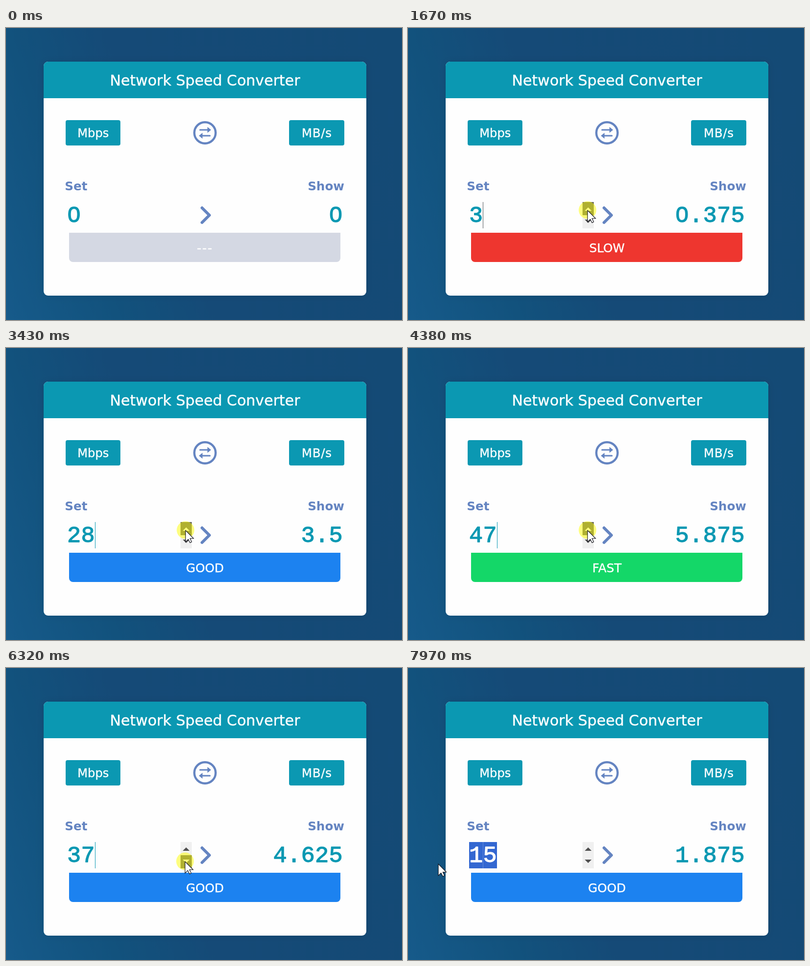
An HTML page with a canvas for the animation above (8 s loop, 810 by 599 pixels).

```html
<!DOCTYPE html>
<html lang="en">
<head>
<meta charset="utf-8">
<title>Network Speed Converter</title>
<style>
  html, body { margin: 0; width: 100%; height: 100%; overflow: hidden; background: #154b77; }
  canvas { display: block; }
</style>
</head>
<body>
<canvas id="stage" width="810" height="599"></canvas>
<script>
const ctx = document.getElementById('stage').getContext('2d');
const LOOP = 8000, FIRST_STEP = 190, STEP = 67.65;
const REPEAT_DELAY = 250, REPEAT = 50;
const TEAL = '#0b98b2', INDIGO = '#6484c1', WHITE = '#fefefe';
const SANS = '"DejaVu Sans", sans-serif', MONO = '"Liberation Mono", monospace';
const DIGIT = 28.5;

// Times the mouse button is held: [down, up]
const FIELD_CLICK = [510, 600], DRAG = [7590, 7950];
const UP_PRESSES = [[1140, 1210], [1400, 1470], [1640, 1710], [1770, 1835],
  [1895, 1960], [2020, 2085], [2145, 4780]];
const DOWN_PRESSES = [[5180, 7360]];
// Pointer path: [time, x, y]
const PATH = [[190, 430, 447], [500, 290, 392], [600, 290, 392], [1100, 367.2, 374],
  [4800, 367.2, 374], [5050, 366.2, 397], [7360, 366.2, 397], [7590, 290, 392], [7900, 62, 402]];

const clamp = (v, lo, hi) => Math.min(hi, Math.max(lo, v));
const isHeld = (t, presses) => presses.some(([down, up]) => t >= down && t < up);

// One step per press, then auto-repeat while it is held
function stepsOf(t, presses) {
  return presses.reduce((sum, [down, up]) => {
    if (t < down) return sum;
    const repeats = Math.floor((Math.min(t, up) - down - REPEAT_DELAY) / REPEAT) + 1;
    return sum + 1 + Math.max(0, repeats);
  }, 0);
}

function pointerAt(t) {
  const next = PATH.findIndex(([time]) => time > t);
  if (next < 0) return PATH[PATH.length - 1].slice(1);
  const [t0, x0, y0] = PATH[Math.max(0, next - 1)], [t1, x1, y1] = PATH[next];
  const p = clamp((t - t0) / (t1 - t0 || 1), 0, 1), e = p * p * (3 - 2 * p);
  return [x0 + (x1 - x0) * e, y0 + (y1 - y0) * e];
}

function rating(value) {
  if (!value) return ['---', '#d4d8e3', 2];
  if (value < 10) return ['SLOW', '#ee362f', 0];
  return value < 40 ? ['GOOD', '#1c82f0', 0] : ['FAST', '#14d768', 0];
}

function box(x, y, w, h, color, radius = 0) {
  ctx.fillStyle = color;
  ctx.beginPath();
  ctx.roundRect(x, y, w, h, radius);
  ctx.fill();
}

function shape(points, color) {
  ctx.fillStyle = color;
  ctx.beginPath();
  points.forEach(([x, y]) => ctx.lineTo(x, y));
  ctx.closePath();
  ctx.fill();
}

function line(points, width) {
  ctx.strokeStyle = INDIGO;
  ctx.lineWidth = width;
  ctx.lineCap = 'round';
  ctx.lineJoin = 'round';
  ctx.beginPath();
  points.forEach(([x, y]) => ctx.lineTo(x, y));
  ctx.stroke();
}

// Text with a thin outline that makes it slightly heavier
function heavyText(str, x, y, color, extra) {
  ctx.fillStyle = ctx.strokeStyle = color;
  ctx.lineWidth = extra;
  ctx.lineJoin = 'round';
  ctx.fillText(str, x, y);
  ctx.strokeText(str, x, y);
}

function label(str, x, y, size, { color = '#fff', align = 'center', weight = 400, spacing = 0 } = {}) {
  ctx.font = `${weight} ${size}px ${SANS}`;
  ctx.letterSpacing = spacing + 'px';
  ctx.textAlign = align;
  heavyText(str, x, y, color, weight === 400 ? 0.4 : 0.01);
  ctx.letterSpacing = '0px';
}

// Monospaced number with plain, undotted zeros
function digits(str, left, selectedFrom = Infinity) {
  [...str].forEach((char, i) => {
    const x = left + i * DIGIT, selected = i >= selectedFrom;
    const back = selected ? '#3367d1' : WHITE;
    if (selected) box(x, 357, DIGIT, 54, back);
    ctx.font = `47px ${MONO}`;
    ctx.textAlign = 'left';
    heavyText(char, x, 397.5, selected ? '#fff' : TEAL, 1.3);
    if (char === '0') {
      ctx.fillStyle = back;
      ctx.beginPath();
      ctx.ellipse(x + DIGIT / 2, 382, 4.6, 8, 0, 0, 7);
      ctx.fill();
    }
  });
}

function background() {
  const g = ctx.createLinearGradient(0, 599, 901, 250);
  [[0, '#165a8a'], [0.22, '#12527d'], [0.42, '#154a77'], [1, '#144a75']]
    .forEach(([at, color]) => g.addColorStop(at, color));
  ctx.fillStyle = g;
  ctx.fillRect(0, 0, 810, 599);
}

function card() {
  ctx.shadowColor = 'rgba(0,0,0,.1)';
  ctx.shadowBlur = 14;
  box(77, 69, 660, 480, WHITE, 9);
  ctx.shadowColor = 'transparent';
  box(77, 69, 660, 75, TEAL, [9, 9, 0, 0]);
  label('Network Speed Converter', 407, 118, 30.1);

  box(122, 189, 112, 52, TEAL, 4);
  box(579, 189, 113, 52, TEAL, 4);
  label('Mbps', 178.3, 224, 24.2);
  label('MB/s', 635.8, 224, 24.5, { spacing: 0.8 });

  ctx.strokeStyle = INDIGO;
  ctx.lineWidth = 4.4;
  ctx.beginPath();
  ctx.arc(407, 215, 21.8, 0, 7);
  ctx.stroke();
  line([[397, 209], [413, 209]], 3.2);
  line([[401, 221], [417, 221]], 3.2);
  shape([[412, 203], [419.5, 209], [412, 215]], INDIGO);
  shape([[402, 215], [394.5, 221], [402, 227]], INDIGO);

  label('Set', 120.3, 333, 24.6, { color: INDIGO, align: 'left', weight: 700 });
  label('Show', 692, 333, 24.6, { color: INDIGO, align: 'right', weight: 700 });
  line([[401, 369], [416, 384], [401, 399]], 6);
}

function spinner(upHeld, downHeld) {
  box(357, 357, 23, 54, '#f0f0f0');
  const half = (held, top, points) => {
    if (held) box(357, top, 23, 27, '#606060');
    shape(points, held ? '#fff' : '#505050');
  };
  half(upHeld, 357, [[361.5, 375], [368.5, 368], [375.5, 375]]);
  half(downHeld, 384, [[361.5, 393], [368.5, 400], [375.5, 393]]);
}

function pointer(x, y, held) {
  if (held) {
    ctx.fillStyle = 'rgba(255,255,0,.5)';
    ctx.beginPath();
    ctx.arc(x, y - 0.5, 18, 0, 7);
    ctx.fill();
  }
  const outline = [[0, 0], [0, 17], [4, 13.2], [6.6, 18.2], [9, 17], [6.6, 12], [11.8, 12]]
    .map(([px, py]) => [x + px * 1.4, y + py * 1.4]);
  shape(outline, '#fff');
  ctx.strokeStyle = '#101018';
  ctx.lineWidth = 1.1;
  ctx.lineJoin = 'miter';
  ctx.stroke();
}

function draw(t) {
  const value = stepsOf(t, UP_PRESSES) - stepsOf(t, DOWN_PRESSES);
  const input = String(value), output = String(value / 8);
  const [x, y] = pointerAt(t);
  const upHeld = isHeld(t, UP_PRESSES), downHeld = isHeld(t, DOWN_PRESSES);
  const fieldHeld = isHeld(t, [FIELD_CLICK, DRAG]);

  background();
  card();

  const [status, color, spacing] = rating(value);
  box(129, 420, 555, 60, color, [0, 0, 8, 8]);
  label(status, 407, 460, 24.8, { spacing });

  const selectedFrom = t >= DRAG[0] ? Math.max(0, Math.round((x - 125) / DIGIT)) : Infinity;
  digits(input, 125, selectedFrom);
  digits(output, 689 - output.length * DIGIT);

  const focused = t >= FIELD_CLICK[0];
  if (focused && selectedFrom >= input.length) {
    box(Math.floor(125 + input.length * DIGIT), 357, 1, 54, value < 10 ? '#555b60' : TEAL);
  }
  if (focused) spinner(upHeld, downHeld);
  if (t >= FIRST_STEP) pointer(x, y, upHeld || downHeld || fieldHeld);
}

// The picture advances in steps, about 15 times a second
function tick() {
  const t = performance.now() % LOOP;
  const step = Math.floor((t - FIRST_STEP + 20) / STEP);
  draw(step < 0 ? 0 : FIRST_STEP + step * STEP);
  requestAnimationFrame(tick);
}
tick();
</script>
</body>
</html>
```
